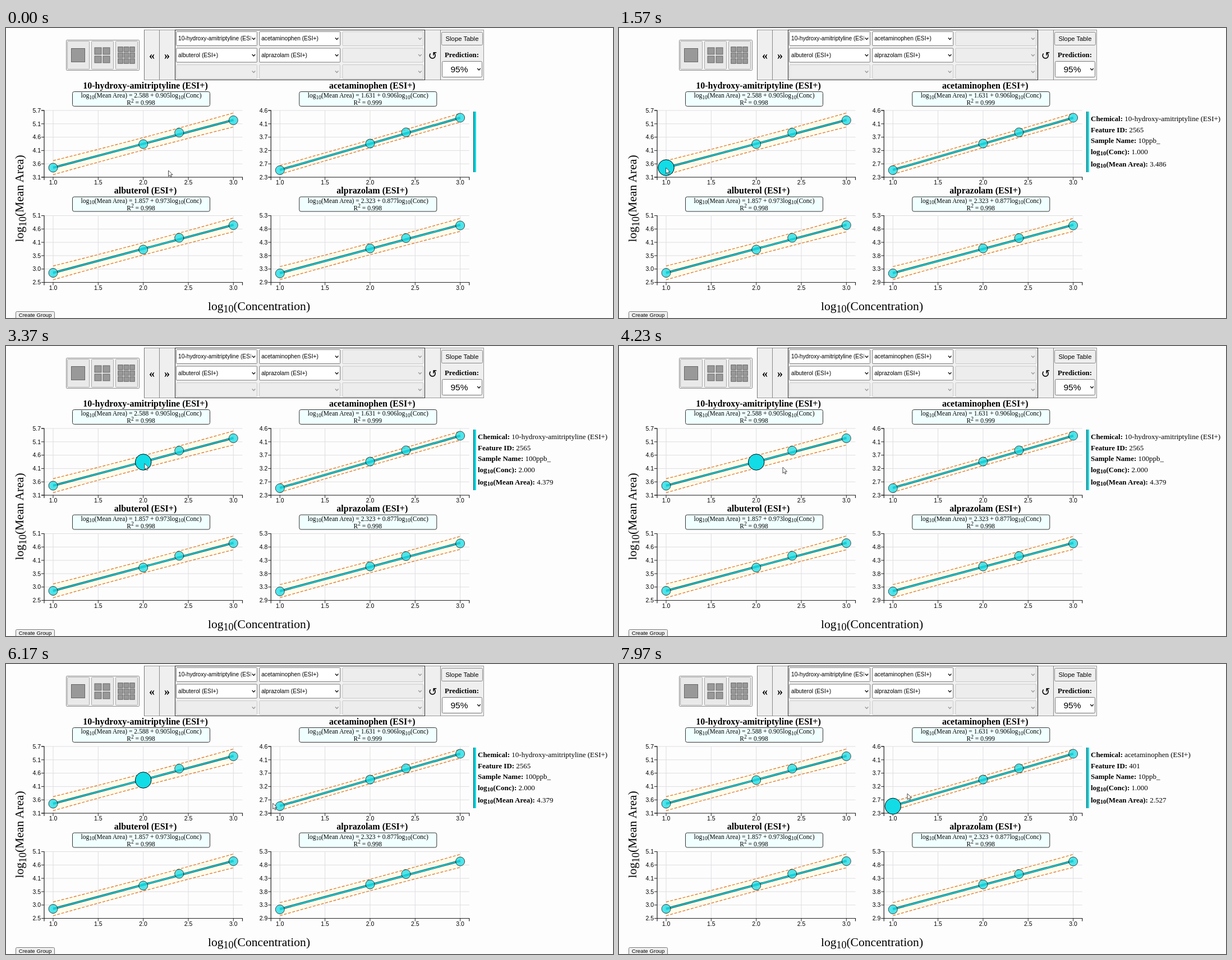
Animation of 1082x517 px, one loop 8000 ms. Source, as an HTML page:

```html
<!DOCTYPE html>
<html lang="en">
<head>
<meta charset="utf-8">
<title>Calibration curves</title>
<style>
  html, body { margin: 0; width: 100%; height: 100%; overflow: hidden; background: #fdfdfd; }
  svg { display: block; width: 1082px; height: 517px; }
  text { white-space: pre; }
  .serif { font-family: "Liberation Serif", "Times New Roman", serif; }
  .sans { font-family: "Liberation Sans", Arial, sans-serif; }
  .bold { font-weight: bold; }
</style>
</head>
<body>
<svg id="stage" viewBox="0 0 1082 517"></svg>
<script>
const stage = document.getElementById("stage");
const CYAN = "#12dce6";
const LOOP = 8000;

function add(tag, attrs, parent = stage) {
  const node = document.createElementNS("http://www.w3.org/2000/svg", tag);
  for (const key in attrs) node.setAttribute(key, attrs[key]);
  parent.appendChild(node);
  return node;
}

const rect = (x, y, width, height, fill, stroke = "none", rx = 0) =>
  add("rect", { x, y, width, height, fill, stroke, rx });

const path = (d, stroke, width = 1, extra = {}) =>
  add("path", { d, stroke, "stroke-width": width, fill: "none", ...extra });

// Markup in text: _{..} lowers, ^{..} raises, *..* is bold.
function setText(node, source) {
  node.textContent = "";
  const size = +node.getAttribute("font-size");
  let shift = 0, bold = false;
  for (const [part, mark, small] of source.matchAll(/([_^])\{(.*?)\}|\*|[^_^*]+|_/g)) {
    if (part === "*") { bold = !bold; continue; }
    const target = mark === "_" ? size * 0.22 : mark === "^" ? -size * 0.36 : 0;
    const span = add("tspan", { dy: target - shift }, node);
    if (mark) span.setAttribute("font-size", size * 0.83);
    if (bold) span.setAttribute("font-weight", "bold");
    span.textContent = small ?? part;
    shift = target;
  }
}

function label(x, y, source, size, style = "serif", anchor = "start", extra = {}) {
  const node = add("text", { x, y, "font-size": size, class: style, "text-anchor": anchor, fill: "#000", ...extra });
  setText(node, source);
  return node;
}

const chevron = (x, y, color, s = 2.8) =>
  path(`M${x - s} ${y - s / 2}l${s} ${s}l${s} ${-s}`, color, 1.4);

function drawToolbar() {
  rect(107.5, 21.5, 130, 54, "#f4f4f4", "#8a8a8a", 1);
  [[1, 24, 0], [2, 12, 3], [3, 8.5, 2]].forEach(([n, size, gap], i) => {
    const left = 109.5 + i * 43;
    rect(left, 23.5, 39, 50, "#e9e9e9", "#aaa", 1);
    const total = n * size + (n - 1) * gap;
    for (let k = 0; k < n * n; k++)
      rect(left + 19 - total / 2 + (k % n) * (size + gap),
           48.5 - total / 2 + Math.floor(k / n) * (size + gap), size, size, "#999", "#666");
  });

  rect(246.5, 3.5, 605, 89, "#efefef", "#999");
  path("M273.5 3V93M774.5 3V93", "#888");
  path("M246.5 3V93", "#777");
  rect(301.5, 3.5, 445, 89, "#f1f1f1", "#333");
  label(260, 55.5, "«", 20, "serif bold", "middle");
  label(287, 55.5, "»", 20, "serif bold", "middle");
  add("text", { x: 760.5, y: 56, "font-size": 19, "text-anchor": "middle",
    "font-family": "DejaVu Sans, sans-serif" }).textContent = "↺";

  const options = ["10-hydroxy-amitriptyline (ESI", "acetaminophen (ESI+)", "",
                   "albuterol (ESI+)", "alprazolam (ESI+)", "", "", "", ""];
  options.forEach((name, i) => {
    const x = 303.5 + (i % 3) * 148.2, y = 6.5 + Math.floor(i / 3) * 29.5;
    rect(x, y, 144, 25, name ? "#fff" : "#ededed", name ? "#777" : "#c8c8c8", 1);
    if (name) label(x + 3.5, y + 15.5, name, 10.2, "sans");
    if (name) rect(x + 133, y + 3, 10, 19, "#fff");
    chevron(x + 138, y + 12.5, name ? "#111" : "#999");
  });

  rect(776.5, 7.5, 73, 23, "#efefef", "#888", 2);
  label(813, 22.5, "Slope Table", 11.3, "sans", "middle");
  label(812.5, 51.5, "Prediction:", 12.8, "serif bold", "middle");
  rect(777.5, 59.5, 71, 28, "#fff", "#777", 2);
  label(792.5, 78.5, "95%", 15.5, "sans");
  chevron(843, 73.5, "#111");
}

// y: heights of the points; ends: fitted line; band: half width of the interval.
const plots = [
  { name: "10-hydroxy-amitriptyline", fit: "2.588 + 0.905", r2: "0.998", y: [249, 207, 186.5, 164.5],
    ends: [249, 164], band: 12.5, ticks: "5.7 5.1 4.6 4.1 3.6 3.1" },
  { name: "acetaminophen", fit: "1.631 + 0.906", r2: "0.999", y: [253.5, 206, 186, 160],
    ends: [253, 160], band: 7.8, ticks: "4.6 4.1 3.7 3.2 2.7 2.3" },
  { name: "albuterol", fit: "1.857 + 0.973", r2: "0.998", y: [249, 207.5, 186.5, 164],
    ends: [249, 163.5], band: 12.3, ticks: "5.1 4.6 4.1 3.5 3.0 2.5" },
  { name: "alprazolam", fit: "2.323 + 0.877", r2: "0.998", y: [250, 205.5, 187, 164.5],
    ends: [249.5, 163.5], band: 11.6, ticks: "5.3 4.8 4.3 3.8 3.3 2.9" },
];
const POINT_X = [84, 244.7, 308.7, 405.3];

function drawPlot(plot, index) {
  const dx = (index % 2) * 404.3, dy = index > 1 ? 187.5 : 0;
  const left = 68 + dx, right = 421.5 + dx, top = 147 + dy, bottom = 266 + dy;
  const center = 248.5 + dx, x0 = 84 + dx, x1 = 405.3 + dx;

  label(center, 107.5 + dy, plot.name + " (ESI+)", 16, "serif bold", "middle");
  rect(118.5 + dx, 113.5 + dy, 245, 26, "#f0ffff", "#333", 3);
  label(center - 7.5, 124 + dy, `log_{10}(Mean Area) = ${plot.fit}log_{10}(Conc)`, 11.5, "serif", "middle");
  label(center - 8, 137 + dy, `R^{2} = ${plot.r2}`, 11.5, "serif", "middle");

  const [a, b] = plot.ends.map(v => v + dy), mid = (a + b) / 2, half = plot.band;
  const pinch = half * 0.78;
  const upper = `M${x0} ${a - half}Q${(x0 + x1) / 2} ${mid - pinch} ${x1} ${b - half}`;
  const lower = `M${x0} ${a + half}Q${(x0 + x1) / 2} ${mid + pinch} ${x1} ${b + half}`;
  add("path", { fill: "#fffdea",
    d: `${upper}L${x1} ${b + half}Q${(x0 + x1) / 2} ${mid + pinch} ${x0} ${a + half}Z` });

  const ticks = plot.ticks.split(" ");
  ticks.forEach((value, i) => {
    const y = top + i * 23.8;
    path(`M${left} ${y}H${right}`, "#dedee2");
    path(`M${left - 5} ${y}H${left}`, "#222");
    label(left - 6, y + 3.7, value, 10.5, "sans", "end");
  });
  for (let i = 0; i < 5; i++) {
    const x = x0 + i * 80.33;
    path(`M${x} ${top}V${bottom}`, "#dedee2");
    path(`M${x} ${bottom}v5`, "#222");
    label(x, bottom + 13.3, (1 + i / 2).toFixed(1), 10.5, "sans", "middle");
  }
  path(`M${left - 5} ${top}H${left}V${bottom}H${left - 5}M${left} ${bottom}v5M${left} ${bottom}H${right}v5`, "#222", 1.2);

  for (const edge of [upper, lower]) path(edge, "#e0803f", 1.4, { "stroke-dasharray": "5 2.6" });
  path(`M${x0} ${a}L${x1} ${b}`, "#0c5358", 3.6);
  path(`M${x0} ${a}L${x1} ${b}`, CYAN, 1.8);
  plot.dots = POINT_X.map((x, i) => add("circle", {
    cx: x + dx, cy: plot.y[i] + dy, r: 8, fill: CYAN, stroke: "#000", opacity: 0.74 }));
}

drawToolbar();
plots.forEach(drawPlot);
label(451, 502.5, "log_{10}(Concentration)", 21.6, "serif", "middle");
label(0, 0, "log_{10}(Mean Area)", 21.6, "serif", "middle", { transform: "translate(31 304) rotate(-90)" });
rect(17.5, 505.5, 69, 20, "#efefef", "#777", 2);
label(52, 514.5, "Create Group", 9.7, "sans", "middle");

rect(833, 149, 5, 108, CYAN);
rect(833, 149, 1.5, 108, "#0c6a70");
const info = [166, 186, 205, 224.5, 246.5].map(y => label(841, y, "", 13));

const cursor = add("path", { d: "M0 0V10.6L2.5 8.3L4.1 12L5.9 11.2L4.3 7.6H7.6Z",
  fill: "#fff", stroke: "#333", "stroke-width": 0.9 });

const hovers = [
  { at: 1050, plot: 0, point: 0, id: 2565, sample: "10ppb_", conc: "1.000", area: "3.486" },
  { at: 2920, plot: 0, point: 1, id: 2565, sample: "100ppb_", conc: "2.000", area: "4.379" },
  { at: 6280, plot: 1, point: 0, id: 401, sample: "10ppb_", conc: "1.000", area: "2.527" },
];
for (const hover of hovers) hover.dot = plots[hover.plot].dots[hover.point];

// [time, x, y] of the pointer tip
const track = [
  [0, 289.5, 254], [200, 289.5, 254], [850, 95, 255], [950, 94.5, 255], [1150, 83.5, 249], [2450, 83.5, 249],
  [3050, 247, 209.5], [3900, 247, 209.5], [4750, 380.5, 229.5], [5300, 380.5, 229.5],
  [6400, 487.5, 250.5], [7350, 487.5, 250.5], [7970, 514, 231], [LOOP, 514, 231],
];

function pointerAt(t) {
  const i = track.findIndex((key, k) => k > 0 && t <= key[0]);
  const [t0, xa, ya] = track[i - 1], [t1, xb, yb] = track[i];
  const u = (t - t0) / (t1 - t0), ease = u * u * (3 - 2 * u);
  return [xa + (xb - xa) * ease, ya + (yb - ya) * ease];
}

let shown;
function showHover(active) {
  if (active === shown) return;
  shown = active;
  for (const { dot } of hovers) {
    const on = active && dot === active.dot;
    dot.setAttribute("r", on ? 14.3 : 8);
    dot.setAttribute("opacity", on ? 1 : 0.74);
  }
  const lines = active ? [
    `*Chemical:* ${plots[active.plot].name} (ESI+)`,
    `*Feature ID:* ${active.id}`,
    `*Sample Name:* ${active.sample}`,
    `*log_{10}(Conc):* ${active.conc}`,
    `*log_{10}(Mean Area):* ${active.area}`,
  ] : [];
  info.forEach((node, i) => setText(node, lines[i] ?? ""));
}

function frame() {
  const t = performance.now() % LOOP;
  cursor.setAttribute("transform", `translate(${pointerAt(t)})`);
  showHover(hovers.findLast(hover => t >= hover.at));
  requestAnimationFrame(frame);
}
frame();
</script>
</body>
</html>
```
